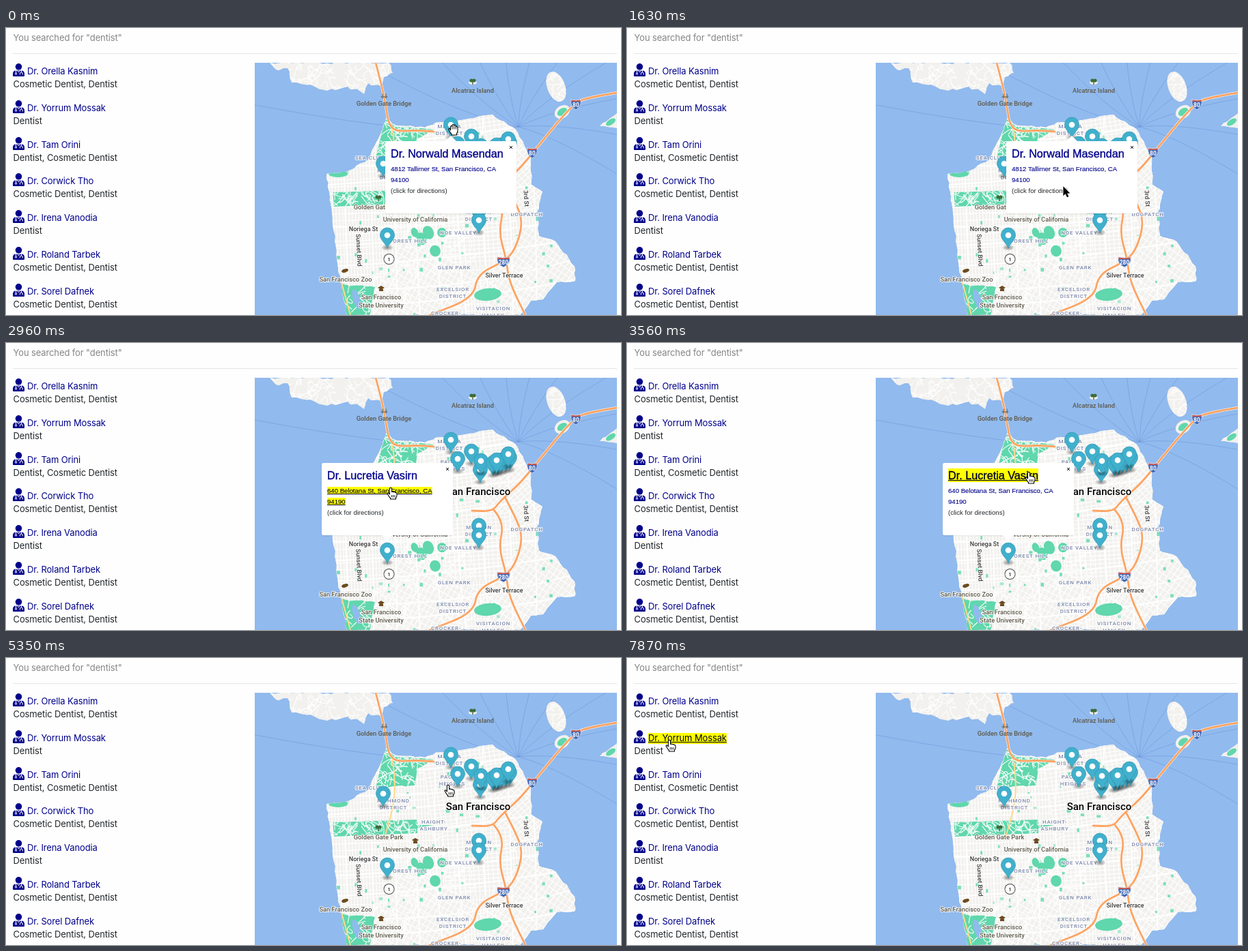
Animation of 900x421 px, one loop 8 s. Source, as an HTML page with a canvas:

```html
<!DOCTYPE html>
<html lang="en">
<head>
<meta charset="utf-8">
<title>Dentist search</title>
<style>
html, body { margin: 0; width: 100%; height: 100%; overflow: hidden; background: #fff; }
canvas { display: block; }
</style>
</head>
<body>
<canvas id="stage" width="900" height="421"></canvas>
<script>
const stage = document.getElementById('stage').getContext('2d');
const LOOP = 8000, STEP = 148, NAVY = '#00008b', YELLOW = '#ffff00';
const WATER = '#91baee', LAND = '#f2f1ee', PARK = '#60d7ac', ORANGE = '#fca463';

// ---- helpers ----
const points = s => s.trim().split(/\s+/).map(p => p.split(',').map(Number));

function randomizer(seed) {
  return () => (seed = (seed * 16807) % 2147483647) / 2147483647;
}

// Closed outline through key points, roughened between them.
function outline(s, roughness = 0) {
  const path = new Path2D(), list = points(s), rnd = randomizer(61);
  const jitter = () => (rnd() - .5) * 2 * roughness;
  list.forEach(([x, y], i) => {
    const [nx, ny] = list[(i + 1) % list.length];
    const parts = roughness ? Math.ceil(Math.hypot(nx - x, ny - y) / 7) : 1;
    path.lineTo(x, y);
    for (let k = 1; k < parts; k++) {
      path.lineTo(x + (nx - x) * k / parts + jitter(), y + (ny - y) * k / parts + jitter());
    }
  });
  path.closePath();
  return path;
}

function curve(s) {
  const path = new Path2D(), list = points(s);
  path.moveTo(...list[0]);
  for (let i = 1; i < list.length - 1; i++) {
    const [x, y] = list[i], [nx, ny] = list[i + 1];
    path.quadraticCurveTo(x, y, (x + nx) / 2, (y + ny) / 2);
  }
  path.lineTo(...list.at(-1));
  return path;
}

function oval(x, y, rx, ry, angle = 0) {
  const path = new Path2D();
  path.ellipse(x, y, rx, ry, angle, 0, Math.PI * 2);
  return path;
}

function stroke(c, path, color, width) {
  c.strokeStyle = color;
  c.lineWidth = width;
  c.stroke(path);
}

function fill(c, path, color) {
  c.fillStyle = color;
  c.fill(path);
}

const disc = (c, x, y, r, color) => fill(c, oval(x, y, r, r), color);

function write(c, text, x, y, font, color, spacing = 0) {
  c.font = font;
  c.fillStyle = color;
  c.letterSpacing = spacing + 'px';
  c.fillText(text, x, y);
}

function clipped(c, path, draw) {
  c.save();
  c.clip(path);
  draw();
  c.restore();
}

// ---- map ----
const coast = outline(`556,132 572,143 613,146 634,138 672,134 712,127 745,148 768,190 769,230
  785,240 777,270 780,305 803,312 832,350 833,371 806,373 786,398 768,400 752,421 499,421 486,352
  477,272 469,214 497,211 530,193 548,155`, 1.2);
const marin = outline(`386,51 395,61 412,59 418,80 452,86 470,92 500,86 524,97 530,81 549,85
  553,72 566,66 560,51`, 2);
const presidio = outline('556,134 572,145 626,149 602,162 598,187 541,190 549,155', 1);
const goldenGatePark = outline('478,241 602,237 602,245 626,245 602,249 602,257 480,262');
const lakeside = outline('490,376 540,380 532,421 499,421', 1);
const treasureIsland = oval(805, 86, 13, 23, -.35);
const yerbaBuena = oval(814, 123, 12, 9, -.6);
const eastShore = outline('869,144 894,125 894,147', 1);

const highways = [
  '541,51 551,88 557,122 560,140 570,152 600,150 626,152',
  '894,95 850,102 829,112 770,184 752,206 722,233 712,247 682,246',
  '714,245 729,262 721,300 732,338 736,372 760,421',
  '730,226 745,254 757,285 745,326 728,343 690,361 684,396 620,421'
].map(curve);
const scenicRoads = ['565,146 570,178 567,219 554,263', '490,370 496,392 504,421'].map(curve);

function streets(c, x, y, size, angle, dx, dy) {
  c.save();
  c.translate(x, y);
  c.rotate(angle);
  c.fillStyle = LAND;
  c.fillRect(-size, -size, size * 2, size * 2);
  c.beginPath();
  for (let i = -size; i < size; i += dx) { c.moveTo(i, -size); c.lineTo(i, size); }
  for (let i = -size; i < size; i += dy) { c.moveTo(-size, i); c.lineTo(size, i); }
  c.strokeStyle = '#fff';
  c.lineWidth = 1.1;
  c.stroke();
  c.restore();
}

function trails(c, seed, count, x, y, w, h) {
  const rnd = randomizer(seed), bend = () => (rnd() - .5) * 36;
  c.beginPath();
  for (let i = 0; i < count; i++) {
    const sx = x + rnd() * w, sy = y + rnd() * h;
    c.moveTo(sx, sy);
    c.bezierCurveTo(sx + bend(), sy + bend(), sx + bend(), sy + bend(), sx + bend(), sy + bend());
  }
  c.strokeStyle = 'rgba(255,255,255,.9)';
  c.lineWidth = 1.2;
  c.stroke();
}

function ferryRoutes(c) {
  c.beginPath();
  for (let i = 0; i < 11; i++) {
    const angle = -3.05 + i * .36, far = 420;
    c.moveTo(750, 145);
    c.quadraticCurveTo(750 + 110 * Math.cos(angle - .3), 145 + 110 * Math.sin(angle - .3),
      750 + far * Math.cos(angle), 145 + far * Math.sin(angle));
  }
  c.strokeStyle = 'rgba(95,137,212,.5)';
  c.lineWidth = .8;
  c.stroke();
}

function avenues(c) {
  c.beginPath();
  for (let i = 0; i < 9; i++) {
    const x = 494 + i * 34, y = 170 + i * 30;
    c.moveTo(x, 130);
    c.quadraticCurveTo(x + 12 * Math.sin(i), 280, x + 10, 421);
    c.moveTo(470, y);
    c.quadraticCurveTo(640, y + 14 * Math.sin(i * 2), 830, y - 40);
  }
  c.strokeStyle = '#fff';
  c.lineWidth = 1.8;
  c.stroke();
}

function pocketParks(c) {
  const rnd = randomizer(2024);
  for (let i = 0; i < 80; i++) {
    c.fillStyle = i % 3 ? '#79dfb9' : '#a8e8d0';
    c.fillRect(482 + rnd() * 325, 150 + rnd() * 270, 2 + rnd() * 4, 2 + rnd() * 4);
  }
  for (let i = 0; i < 5; i++) {
    fill(c, oval(598 + i * 10, 300 + i * 9 * (i % 2), 5 + rnd() * 3, 7 + rnd() * 4, -.4), PARK);
  }
  fill(c, oval(705, 391, 20, 9, -.1), PARK);
}

function drawLand(c) {
  for (const land of [marin, treasureIsland, yerbaBuena, eastShore, oval(683, 80, 6, 3)]) {
    fill(c, land, LAND);
  }
  clipped(c, marin, () => trails(c, 41, 60, 390, 51, 170, 45));
  clipped(c, treasureIsland, () => trails(c, 7, 18, 790, 65, 30, 45));
  fill(c, oval(814, 123, 8, 5, -.6), PARK);
  fill(c, oval(885, 138, 8, 4, -.6), PARK);

  clipped(c, coast, () => {
    streets(c, 560, 300, 320, -.04, 4.7, 10);
    streets(c, 690, 180, 75, -.15, 7, 6);
    streets(c, 750, 225, 42, -.75, 8, 6);
    streets(c, 690, 300, 48, -.06, 7, 6);
    streets(c, 610, 390, 62, .5, 7, 9);
    streets(c, 775, 375, 62, .6, 7, 9);
    trails(c, 93, 70, 580, 275, 90, 80);
    trails(c, 17, 70, 540, 345, 220, 76);
    avenues(c);
    pocketParks(c);
    for (const park of [presidio, goldenGatePark, lakeside, oval(486, 214, 14, 5)]) fill(c, park, PARK);
    clipped(c, presidio, () => trails(c, 5, 60, 540, 135, 75, 55));
    clipped(c, goldenGatePark, () => trails(c, 8, 48, 480, 238, 120, 24));
    clipped(c, lakeside, () => trails(c, 19, 14, 492, 376, 45, 45));
    fill(c, oval(513, 398, 5, 15, -.3), WATER);
    scenicRoads.forEach(road => stroke(c, road, '#ffd98a', 2));
  });
}

const labelStyles = {
  area: { font: '500 8px Roboto, sans-serif', color: '#7c86a8', spacing: .75, line: 9.5 },
  place: { font: '500 9.3px Roboto, sans-serif', color: '#5d5848', spacing: 0, line: 12 },
  street: { font: '500 9px Roboto, sans-serif', color: '#3a3a3a', spacing: 0, line: 10 },
  city: { font: '500 15px Roboto, sans-serif', color: '#000', spacing: 0, line: 16 }
};

function label(c, text, x, y, kind = 'area', angle = 0) {
  const { font, color, spacing, line } = labelStyles[kind];
  c.save();
  c.translate(x, y);
  c.rotate(angle);
  c.textAlign = 'center';
  c.textBaseline = 'middle';
  c.lineJoin = 'round';
  c.font = font;
  c.letterSpacing = spacing + 'px';
  c.strokeStyle = y > 130 ? 'rgba(255,255,255,.85)' : 'transparent';
  c.lineWidth = 2;
  text.split('|').forEach((part, i) => {
    c.strokeText(part, 0, i * line);
    write(c, part, 0, i * line, font, color, spacing);
  });
  c.restore();
}

function drawLabels(c) {
  label(c, 'Golden Gate Bridge', 553, 111, 'place');
  label(c, 'Alcatraz Island', 683, 92, 'place');
  label(c, 'MARINA|DISTRICT', 649, 145);
  label(c, 'PACIFIC|HEIGHTS', 653, 175);
  label(c, 'SEA CLIFF', 533, 191);
  label(c, 'RICHMOND|DISTRICT', 567, 210);
  label(c, 'Golden Gate Park', 545, 263, 'place');
  label(c, 'HAIGHT-|ASHBURY', 626, 241);
  label(c, 'University of California', 599, 281, 'place');
  label(c, 'MISSION|DISTRICT', 692, 271);
  label(c, 'DOGPATCH', 762, 274);
  label(c, 'NOE VALLEY', 662, 301);
  label(c, 'FOREST HILL', 589, 313);
  label(c, 'Noriega St', 523, 295, 'street');
  label(c, 'Sunset Blvd', 516, 326, 'street', 1.52);
  label(c, '3rd St', 761, 250, 'street', 1.5);
  label(c, 'GLEN PARK', 656, 352);
  label(c, 'Silver Terrace', 729, 363, 'street');
  label(c, 'San Francisco Zoo', 497, 369, 'place');
  label(c, 'San Francisco|State University', 549, 395, 'place');
  label(c, 'EXCELSIOR|DISTRICT', 654, 384);
  label(c, 'VISITACION|VALLEY', 713, 412);
  label(c, 'CROCKER-', 644, 419);
  label(c, 'San Francisco', 691, 219, 'city');
}

function shield(c, text, x, y) {
  const w = text.length > 2 ? 10 : 8;
  c.save();
  c.translate(x, y);
  const path = new Path2D(`M${1 - w}-7Q0-5 ${w - 1}-7Q${w + 1} 3 0 8Q${-w - 1} 3 ${1 - w}-7Z`);
  fill(c, path, '#4169b8');
  clipped(c, path, () => {
    c.fillStyle = '#c9584c';
    c.fillRect(-12, -8, 24, 4);
  });
  stroke(c, path, '#e8ecf6', .7);
  c.textAlign = 'center';
  write(c, text, 0, 4, '700 8.5px Roboto, sans-serif', '#fff');
  c.restore();
}

function tree(c, x, y) {
  for (const side of [-2, 2]) disc(c, x + side, y - 1, 2.6, '#3e6b38');
  c.fillRect(x - .7, y, 1.4, 5);
}

function cap(c, x, y) {
  fill(c, outline(`${x - 5},${y - 1} ${x},${y - 4} ${x + 5},${y - 1} ${x},${y + 2}`), '#6b4c20');
  c.fillRect(x - 3, y + 1, 6, 3);
}

function pin(c, x, y) {
  c.save();
  c.translate(x, y);
  for (let i = 5; i > 0; i--) fill(c, oval(0, 18, i * 1.7, i * .85), 'rgba(0,0,0,.09)');
  const body = new Path2D('M0 18.5C-2.5 12-10.5 7-10.5-.5A10.5 10.5 0 0 1 10.5-.5C10.5 7 2.5 12 0 18.5Z');
  fill(c, body, '#40b0cd');
  stroke(c, body, '#3698b2', .8);
  disc(c, 0, 0, 4.3, '#fff');
  c.restore();
}

function drawPins(c) {
  const spread = '651,142 681,159 661,170 552,199 694,186 695,173 692,268 692,282 558,304';
  points(spread).forEach(([x, y]) => pin(c, x, y));
  for (let i = 0; i < 5; i++) pin(c, 713 + i * 6, 176 - i * 2);
  pin(c, 718, 172);
  pin(c, 735, 163);
}

function drawMap(c) {
  c.beginPath();
  c.rect(364, 51, 530, 370);
  c.clip();
  c.fillStyle = WATER;
  c.fillRect(364, 51, 530, 370);
  ferryRoutes(c);
  drawLand(c);
  c.lineCap = 'round';
  highways.forEach(road => stroke(c, road, '#fff', 3.8));
  highways.forEach(road => stroke(c, road, ORANGE, 2.8));
  tree(c, 683, 78);
  tree(c, 545, 249);
  cap(c, 599, 268);
  cap(c, 549, 382);
  stroke(c, new Path2D('M549 101H558M551 97V103M556 97V103'), '#5d5848', 1);
  fill(c, oval(496, 356, 5, 2.5, -.3), '#6b4c20');
  drawLabels(c);
  shield(c, '80', 834, 112);
  shield(c, '80', 770, 183);
  shield(c, '280', 728, 343);
  disc(c, 560.5, 339, 8, '#444');
  disc(c, 560.5, 339, 7.1, '#fff');
  c.textAlign = 'center';
  write(c, '1', 560.5, 342, '500 8px Roboto, sans-serif', '#222');
  drawPins(c);
}

// ---- page ----
const rows = [
  ['Dr. Orella Kasnim', 'Cosmetic Dentist, Dentist'],
  ['Dr. Yorrum Mossak', 'Dentist'],
  ['Dr. Tam Orini', 'Dentist, Cosmetic Dentist'],
  ['Dr. Corwick Tho', 'Cosmetic Dentist, Dentist'],
  ['Dr. Irena Vanodia', 'Dentist'],
  ['Dr. Roland Tarbek', 'Cosmetic Dentist, Dentist'],
  ['Dr. Sorel Dafnek', 'Cosmetic Dentist, Dentist']
];
const LIST_FONT = '13px Inter, sans-serif', LIST_SPACING = -.12;
const TITLE_FONT = '16.2px "Liberation Sans", sans-serif';
const SMALL_FONT = '9.6px "Liberation Sans", sans-serif';
const popups = {
  north: { x: 555, y: 166, tipY: -8, name: 'Dr. Norwald Masendan',
    address: ['4812 Tallimer St, San Francisco, CA', '94100'] },
  west: { x: 462, y: 176, tipY: 114, name: 'Dr. Lucretia Vasirn',
    address: ['640 Belotana St, San Francisco, CA', '94190'] }
};

function link(c, text, x, y, font, hover, { up, down, spacing = 0, weight = 0 }) {
  c.font = font;
  c.letterSpacing = spacing + 'px';
  const width = c.measureText(text).width, color = hover ? '#000022' : NAVY;
  if (hover) {
    c.fillStyle = YELLOW;
    c.fillRect(x, y - up, width, up + down);
    c.fillStyle = color;
    c.fillRect(x, Math.round(y + 1), width, 1);
  }
  write(c, text, x, y, font, color, spacing);
  if (weight) {
    c.strokeStyle = color;
    c.lineWidth = weight;
    c.strokeText(text, x, y);
  }
}

function doctor(c, x, y) {
  c.save();
  c.translate(x, y);
  disc(c, 8.5, 4.8, 4.8, NAVY);
  fill(c, new Path2D('M0 18V15Q0 10.6 4.5 10.4H12.5Q17 10.6 17 15V18Q17 19 16 19H1Q0 19 0 18Z'), NAVY);
  stroke(c, new Path2D('M4.6 10V14M12.4 10V13M10.4 16.5V15A2 2 0 0 1 14.4 15V16.5M6.5 10.4L8.5 13L10.5 10.4'), '#fff', 1);
  disc(c, 4.6, 15, 1.6, '#fff');
  disc(c, 4.6, 15, .7, NAVY);
  c.restore();
}

function drawList(c, hover) {
  write(c, 'You searched for "dentist"', 10.5, 19, LIST_FONT, '#858585', LIST_SPACING);
  c.fillStyle = '#e5e5e5';
  c.fillRect(10, 37, 884, 1);
  rows.forEach(([name, skills], i) => {
    const y = Math.round(i * 53.83);
    doctor(c, 10, 52 + y);
    link(c, name, 31, 68 + y, LIST_FONT, hover === i, { up: 12, down: 4, spacing: LIST_SPACING });
    write(c, skills, 10.5, 87 + y, LIST_FONT, '#212529', LIST_SPACING);
  });
}

function drawPopup(c, { x, y, tipY, name, address }, hover) {
  c.save();
  c.translate(x, y);
  c.save();
  c.shadowColor = 'rgba(0,0,0,.1)';
  c.shadowBlur = 2;
  c.shadowOffsetY = 1;
  c.fillStyle = '#fff';
  c.beginPath();
  c.roundRect(0, 0, 192, 106, 2.5);
  c.fill();
  c.restore();
  const base = tipY < 0 ? 0 : 106;
  fill(c, outline(`88,${base} 96,${tipY} 104,${base}`), '#fff');
  link(c, name, 8, 24, TITLE_FONT, hover === 'title', { up: 16, down: 4, weight: .35 });
  address.forEach((line, i) =>
    link(c, line, 8, 44 + i * 16, SMALL_FONT, hover === 'address', { up: 9, down: 2, weight: .12 }));
  write(c, '(click for directions)', 8, 76, SMALL_FONT, '#212529');
  stroke(c, new Path2D('M182 7l4 4m0-4l-4 4'), '#111', 1);
  c.restore();
}

// ---- pointer ----
const cursors = {
  arrow: [new Path2D('M0 0V14L3.2 11L5.6 16L8 15L5.7 10.2H10Z')],
  hand: [
    new Path2D('M-1.6 10V1.4Q0-.8 1.6 1.4V6.5Q3.2 5.2 4.4 6.8Q6 6 7 7.6Q9 7.2 9 9.5V12Q8.6 14 7.5 15V17H-.5V15.5Q-2.5 13.5-3.5 11.5L-5 9Q-4.6 7.2-3 8.2Z'),
    new Path2D('M1.3 11V14.5M3.6 11V14.5M5.9 11V14.5')
  ],
  grab: [
    new Path2D('M-4.5 1V-4.5Q-3.2-6.5-2-4.5V-6.5Q-.6-8.5.7-6.5V-6Q2-7.6 3.3-5.8V-4Q4.8-5.2 6-3.4V2Q5.6 5 4.5 6V8H-3V6.5Q-5 4.5-6.5 1.5L-7.5-.5Q-7-2.2-5.4-1Z'),
    new Path2D('M-2-4.5V-.5M.7-6V-.5M3.3-5V-.5')
  ]
};

function drawCursor(c, kind, x, y) {
  const [shape, details] = cursors[kind];
  c.save();
  c.translate(x, y);
  c.lineJoin = 'round';
  if (kind === 'arrow') {
    stroke(c, shape, '#fff', 2);
    fill(c, shape, '#000');
  } else {
    fill(c, shape, '#fff');
    stroke(c, shape, '#000', 1.1);
    stroke(c, details, '#000', .9);
  }
  c.restore();
}

// Each move reaches its place in a few equal steps, then rests there.
const moves = [
  { at: 0, steps: 1, x: 655, y: 149, cursor: 'grab' },
  { at: 140, steps: 2, x: 658, y: 188, cursor: 'hand', hover: 'title' },
  { at: 880, steps: 3, x: 659, y: 211, cursor: 'hand', hover: 'address' },
  { at: 1630, steps: 5, x: 556, y: 317, cursor: 'grab' },
  { at: 2810, steps: 2, x: 563, y: 212, cursor: 'hand', hover: 'address' },
  { at: 3410, steps: 2, x: 588, y: 189, cursor: 'hand', hover: 'title' },
  { at: 4750, steps: 1, x: 614, y: 188, cursor: 'arrow', hover: 'title' },
  { at: 4900, steps: 2, x: 647, y: 186, cursor: 'hand' },
  { at: 5640, steps: 4, x: 48, y: 69, cursor: 'arrow' },
  { at: 6380, steps: 1, x: 50, y: 66, cursor: 'hand', hover: 0 },
  { at: 7120, steps: 4, x: 62, y: 115, cursor: 'hand', hover: 1 },
  { at: 7870, steps: 1, x: 62, y: 120, cursor: 'hand', hover: 1 }
];

function openPopup(now) {
  if (now < 2360) return popups.north;
  return now < 5200 ? popups.west : null;
}

function travelCursor(x, y, popup) {
  const inPopup = popup && x > popup.x && x < popup.x + 192 && y > popup.y && y < popup.y + 106;
  return x < 364 || inPopup ? 'arrow' : 'grab';
}

function pointerAt(now, popup) {
  const i = moves.findLastIndex(m => m.at <= now);
  const move = moves[i], from = moves[i - 1] || move;
  const done = Math.min(1, (Math.floor((now - move.at) / STEP) + 1) / move.steps);
  const x = from.x + (move.x - from.x) * done, y = from.y + (move.y - from.y) * done;
  return done === 1 ? move : { x, y, cursor: travelCursor(x, y, popup) };
}

const map = document.createElement('canvas');
map.width = 900;
map.height = 421;
drawMap(map.getContext('2d'));

function frame() {
  const now = performance.now() % LOOP;
  const popup = openPopup(now);
  const { x, y, cursor, hover } = pointerAt(now, popup);
  stage.fillStyle = '#fefefe';
  stage.fillRect(0, 0, 900, 421);
  drawList(stage, hover);
  stage.drawImage(map, 0, 0);
  if (popup) drawPopup(stage, popup, hover);
  drawCursor(stage, cursor, x, y);
  requestAnimationFrame(frame);
}
frame();
</script>
</body>
</html>
```
